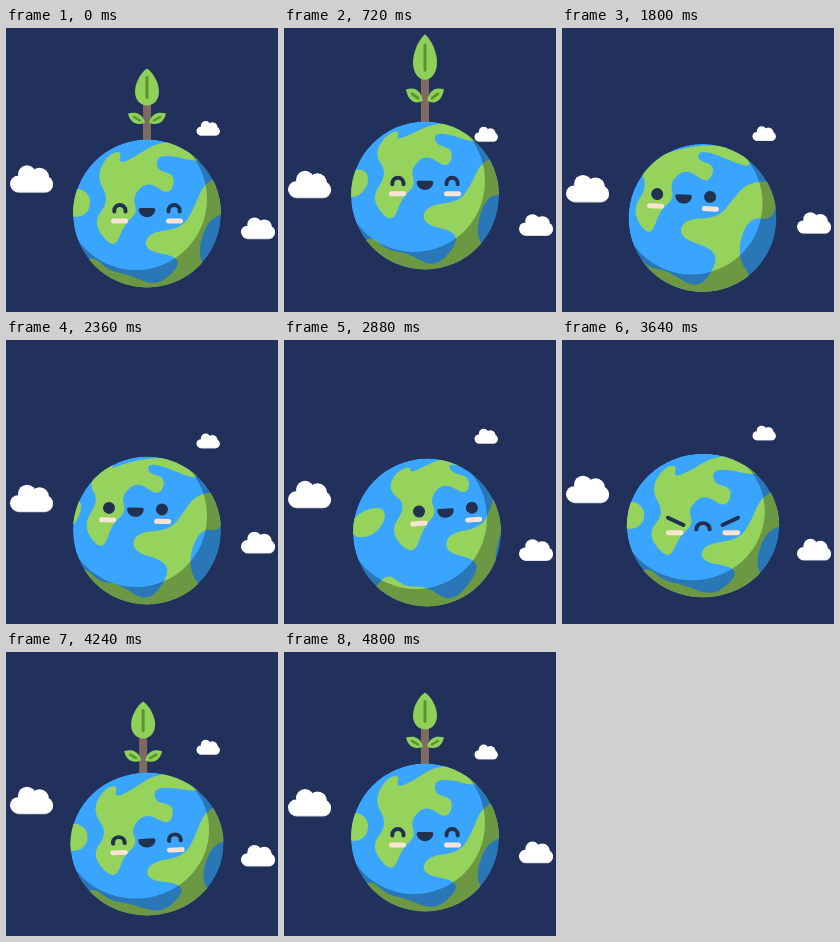
These frames come from a looping animation (272x284 px, 4840 ms). An HTML page with a canvas:

```html
<!DOCTYPE html>
<html>
<head>
<meta charset="utf-8">
<title>Happy planet</title>
<style>
html, body { margin: 0; width: 100%; height: 100%; overflow: hidden; background: #22315b; }
canvas { display: block; }
</style>
</head>
<body>
<canvas id="stage" width="272" height="284"></canvas>
<script>
const ctx = document.getElementById('stage').getContext('2d');
const LOOP = 4840, R = 74, TAU = Math.PI * 2;
const INK = '#22314f', LEAF = '#8fd058', VEIN = '#5b942f';

// Control points of the coastlines, with the globe centred on (141, 185).
const coasts = [
  '90,148 102,126 116,122 112,136 130,128 150,114 184,112 202,136 152,124 150,142 170,146 164,168 142,152 126,168 132,184 118,196 108,222 86,194 104,172',
  '56,168 70,158 84,166 84,182 72,190 56,184',
  '224,144 198,154 188,180 176,200 142,204 138,222 172,228 172,240 150,258 122,246 102,242 84,224 60,260 150,290 210,250 190,228 202,190 224,184'
].map(list => list.split(' ').map(pair => {
  const [x, y] = pair.split(',');
  return [x - 141, y - 185];
}));
const leaf = new Path2D('M0 -71C7 -66 12 -56 12 -48C12 -39 6 -34 0 -34C-6 -34 -12 -39 -12 -48C-12 -56 -7 -66 0 -71Z');
const sideLeaf = new Path2D('M2 -17C5 -27 12 -28 19 -26C17 -17 10 -13 2 -17Z');
const mouth = new Path2D('M-6.5 -5.5H6.5Q8.5 -5.5 8.3 -3.5C7 6 -7 6 -8.3 -3.5Q-8.5 -5.5 -6.5 -5.5Z');

// Eased 0 to 1 between two times, and a rise to a peak and back.
function ramp(t, from, to) {
  const p = Math.min(1, Math.max(0, (t - from) / (to - from)));
  return p * p * (3 - 2 * p);
}
const pulse = (t, from, peak, to) => ramp(t, from, peak) - ramp(t, peak, to);
const wave = (t, size, phase, turns = 1) => size * Math.sin(t / LOOP * TAU * turns + phase);

function pose(t) {
  const hop = pulse(t, 570, 790, 1030), land = pulse(t, 950, 1030, 1150);
  const away = ramp(t, 1160, 1500) - ramp(t, 3240, 3440);
  const right = ramp(t, 2250, 2640) - ramp(t, 3240, 3440);
  const left = away - right;
  const strain = ramp(t, 3300, 3560) - ramp(t, 3860, 3960);
  const crouch = pulse(t, 3740, 3860, 3960);
  const burst = pulse(t, 3900, 4070, 4220), settle = pulse(t, 4120, 4240, 4680);
  return {
    x: 141 + 2 * right - .5 * left,
    y: 185.5 + 4.5 * away + 2.5 * right - 23.5 * hop + 13 * land + 26 * crouch - 19 * burst + 6.5 * settle,
    squash: .05 * land + .03 * strain + .03 * crouch + .035 * settle,
    lookX: 20 * (right - left),
    lookY: 5 * crouch - 17 * away - 12 * hop - 9 * burst,
    tilt: (3 * left - 4 * right - 3 * settle) * Math.PI / 180,
    plant: 1 - ramp(t, 940, 1110) + ramp(t, 3915, 4030) + .3 * (hop + burst)
  };
}

function within(draw) {
  ctx.save();
  draw();
  ctx.restore();
}

function fill(color, path, rule) {
  ctx.fillStyle = color;
  ctx.fill(path, rule);
}

function line(color, width, path) {
  ctx.strokeStyle = color;
  ctx.lineWidth = width;
  ctx.stroke(new Path2D(path));
}

function disc(x, y, r) {
  const path = new Path2D();
  path.arc(x, y, r, 0, TAU);
  return path;
}

function pill(x, y, w, h) {
  const path = new Path2D();
  path.roundRect(x, y, w, h, h / 2);
  return path;
}

// Smooth closed curve through the midpoints of its control points.
function blob(points) {
  const path = new Path2D();
  points.forEach(([x, y], i) => {
    const [nx, ny] = points[(i + 1) % points.length];
    const mid = [(x + nx) / 2, (y + ny) / 2];
    if (i) path.quadraticCurveTo(x, y, ...mid);
    else path.moveTo(...mid);
  });
  const [x, y] = points[0], [nx, ny] = points[1];
  path.quadraticCurveTo(x, y, (x + nx) / 2, (y + ny) / 2);
  return path;
}

// The surface slides less towards the rim, like a turning ball.
function turn([x, y], s) {
  const rim = Math.min(1, (Math.hypot(x, y) / R) ** 4);
  return [x + s.lookX * (1 - rim / 2), y + s.lookY * (1 - rim)];
}

function drawCloud(x, y, scale) {
  within(() => {
    ctx.translate(x, y);
    ctx.scale(scale, scale);
    fill('#d9dce4', pill(1, 12, 42, 16));
    for (const part of [pill(0, 11, 43, 16), disc(17, 9.5, 9), disc(29.5, 12.5, 9.5)]) fill('#fff', part);
  });
}

function drawPlant(s) {
  if (s.plant < .02) return;
  within(() => {
    ctx.translate(s.x + R * Math.sin(s.tilt), s.y - R * (1 - s.squash));
    ctx.scale(Math.min(1, s.plant * 1.5), s.plant);
    ctx.fillStyle = '#7d6b62';
    ctx.fillRect(-4, -37, 8, 45);
    fill(LEAF, leaf);
    line(VEIN, 3, 'M0 -62V-42');
    ctx.translate(0, s.squash * 130);
    for (const side of [-1, 1]) within(() => {
      ctx.scale(side, 1);
      fill(LEAF, sideLeaf);
      line(VEIN, 2.5, 'M7 -19L13 -22.5');
    });
  });
}

function drawFace(t) {
  const mood = t < 1130 || t >= 3940 ? 'happy' : t < 3380 ? 'open' : 'angry';
  for (const side of [-1, 1]) within(() => {
    ctx.scale(side, 1);
    fill('#fbe3d5', pill(19, 5, 17, 5));
    if (mood === 'happy') line(INK, 4, 'M21.5 -2V-3A5.6 5.6 0 0 1 32.7 -3V-2');
    else if (mood === 'angry') line(INK, 4, 'M19 -.5L34 -8');
    else fill(INK, disc(26.5, -4.5, 6));
  });
  if (mood === 'angry') line(INK, 4, 'M-6.5 4A6.5 6.5 0 0 1 6.5 4');
  else fill(INK, mouth);
}

function drawGlobe(t, s) {
  const globe = disc(0, 0, R);
  within(() => {
    ctx.translate(s.x, s.y);
    ctx.scale(1 + s.squash, 1 - s.squash);
    ctx.clip(globe);
    fill('#3aa5ff', globe);
    within(() => {
      ctx.rotate(s.tilt);
      for (const coast of coasts) fill('#95d35d', blob(coast.map(point => turn(point, s))));
    });
    const shade = new Path2D('M-90 -90H90V90H-90Z');
    shade.addPath(disc(-11, -14.5, 71));
    fill('rgba(0,0,0,.28)', shade, 'evenodd');
    ctx.rotate(s.tilt);
    ctx.translate(s.lookX, s.lookY);
    drawFace(t);
  });
}

function draw(now) {
  const t = now % LOOP, s = pose(t);
  ctx.fillStyle = '#22315b';
  ctx.fillRect(0, 0, 272, 284);
  ctx.lineCap = 'round';
  drawPlant(s);
  drawGlobe(t, s);
  drawCloud(4, 140.3 + wave(t, 6.2, -.6), 1);
  drawCloud(190.5, 92.7 + wave(t, 7.3, 0), .54);
  drawCloud(235, 190.7 + wave(t, 8, -2.93) + wave(t, 2.5, 0, 2), .79);
  requestAnimationFrame(draw);
}
requestAnimationFrame(draw);
</script>
</body>
</html>
```
